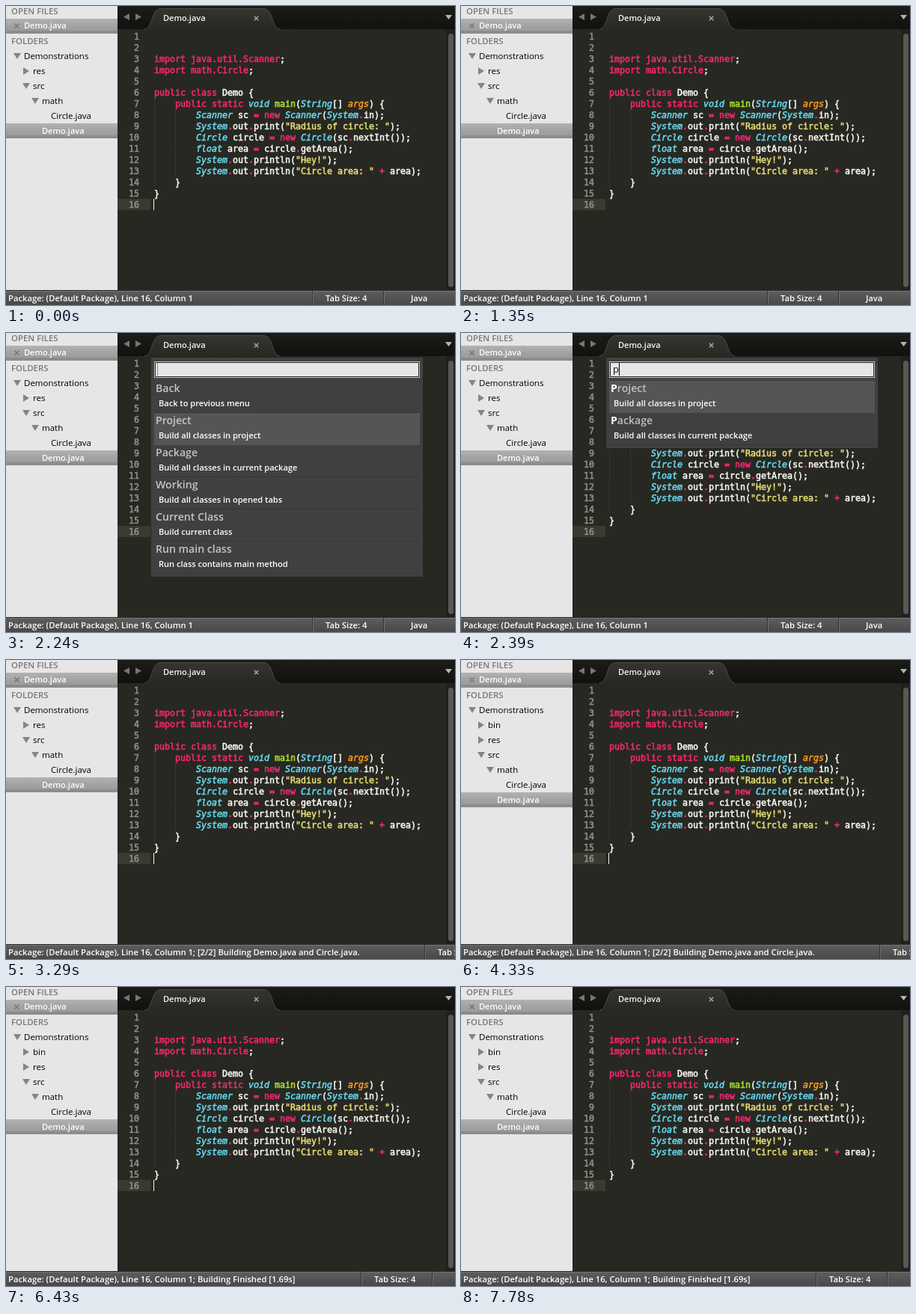
These frames come from a looping animation (600x400 px, 8 s). An HTML page with a canvas:

```html
<!DOCTYPE html>
<html lang="en">
<head>
<meta charset="utf-8">
<title>Building a Java project</title>
<style>
html, body { margin: 0; width: 100%; height: 100%; overflow: hidden; background: #272822; }
canvas { display: block; width: 600px; height: 400px; }
</style>
</head>
<body>
<canvas id="stage" width="600" height="400"></canvas>
<script>
const ctx = document.getElementById('stage').getContext('2d');
const LOOP = 8000, CHAR = 7, LINE = 15, CODE_X = 198;
const UI = '"Open Sans", "Noto Sans", sans-serif';
const MONO = '"DejaVu Sans Mono", monospace';
const HEADING = `600 11.4px ${UI}`, STATUS = `600 11.22px ${UI}`, TREE = `500 11.5px ${UI}`;
const PINK = '#f92672', CYAN = '#66d9ef', GREEN = '#a6e22e',
      ORANGE = '#fd971f', YELLOW = '#e6db74', WHITE = '#f8f8f2';

const code = `

import java.util.Scanner;
import math.Circle;

public class Demo {
    public static void main(String[] args) {
        Scanner sc = new Scanner(System.in);
        System.out.print("Radius of circle: ");
        Circle circle = new Circle(sc.nextInt());
        float area = circle.getArea();
        System.out.println("Hey!");
        System.out.println("Circle area: " + area);
    }
}
`.split('\n');

const menu = [
  ['Back', 'Back to previous menu'],
  ['Project', 'Build all classes in project'],
  ['Package', 'Build all classes in current package'],
  ['Working', 'Build all classes in opened tabs'],
  ['Current Class', 'Build current class'],
  ['Run main class', 'Run class contains main method']
];

// Caret opacity as [time, alpha] steps
const editorCaret = [[0, 1], [150, .4], [300, 0], [750, .4], [900, 1], [1200, .4], [1350, 0],
  [1800, 0], [3290, 1], [3590, .4], [3740, 0], [4190, .4], [4330, 1], [4630, .4], [4780, 0],
  [5230, .4], [5380, 1], [5680, .4], [5830, 0], [6280, .4], [6430, 1], [6730, .4], [6880, 0],
  [7330, .4], [7480, 1], [7630, .4], [7780, 0]];
const menuCaret = [[1800, 1], [2100, .4], [2250, 0], [2390, 1], [2690, .4], [2840, 0]];
const stepAt = (steps, t) => steps.filter(s => s[0] <= t).pop()[1];

function rect(x, y, w, h, fill) {
  ctx.fillStyle = fill;
  ctx.fillRect(x, y, w, h);
}

function vertical(y, h, ...colors) {
  const g = ctx.createLinearGradient(0, y, 0, y + h);
  colors.forEach((c, i) => g.addColorStop(i / (colors.length - 1), c));
  return g;
}

function text(s, x, y, fill, font = `600 11.05px ${UI}`) {
  ctx.font = font;
  ctx.fillStyle = fill;
  ctx.fillText(s, x, y);
}

function poly(fill, ...p) {
  ctx.fillStyle = fill;
  ctx.beginPath();
  for (let i = 0; i < p.length; i += 2) ctx.lineTo(p[i], p[i + 1]);
  ctx.fill();
}

function cross(x, y, r, color) {
  ctx.strokeStyle = color;
  ctx.lineWidth = 1.6;
  ctx.beginPath();
  ctx.moveTo(x - r, y - r); ctx.lineTo(x + r, y + r);
  ctx.moveTo(x + r, y - r); ctx.lineTo(x - r, y + r);
  ctx.stroke();
}

function caret(x, y, h, color, alpha) {
  ctx.globalAlpha = alpha;
  rect(x, y, 1, h, color);
  ctx.globalAlpha = 1;
}

function selectedRow(y) {
  rect(0, y, 149, 20, vertical(y, 20, '#b2b2b2', '#a2a2a2', '#989898'));
  rect(0, y + 16, 149, 4, '#8c8c8c');
}

function sidebar(hasBin) {
  rect(0, 0, 149, 380, '#e6e6e6');
  text('OPEN FILES', 7, 11, '#777', HEADING);
  selectedRow(17);
  cross(14.5, 26.5, 3, '#777');
  text('Demo.java', 24, 30, '#fff');
  text('FOLDERS', 7, 51, '#777', HEADING);

  const tree = [['Demonstrations', 24, 'open'], ['res', 36, 'shut'], ['src', 36, 'open'],
    ['math', 48, 'open'], ['Circle.java', 60], ['Demo.java', 48]];
  if (hasBin) tree.splice(1, 0, ['bin', 36, 'shut']);
  tree.forEach(([name, x, fold], i) => {
    const y = 67 + 20 * i, last = i === tree.length - 1;
    if (last) selectedRow(y - 10);
    if (fold === 'open') poly('#858585', x - 14, y - 4, x - 4, y - 4, x - 9, y + 4);
    if (fold === 'shut') poly('#858585', x - 13, y - 5, x - 5, y, x - 13, y + 5);
    text(name, x, y + 4, last ? '#fff' : '#000', last ? undefined : TREE);
  });
}

function tabs() {
  rect(149, 0, 451, 31, vertical(0, 31, '#1b1c18', '#11120f'));
  ctx.beginPath();
  ctx.moveTo(185, 31);
  ctx.bezierCurveTo(197, 30, 193, 3.5, 207, 3.5);
  ctx.lineTo(344, 3.5);
  ctx.bezierCurveTo(358, 3.5, 354, 30, 366, 31);
  ctx.fillStyle = vertical(4, 27, '#34352f', '#272822');
  ctx.fill();
  ctx.strokeStyle = '#4b4c46';
  ctx.lineWidth = 1;
  ctx.stroke();
  poly('#777873', 165, 10, 165, 19, 157, 14.5);
  poly('#777873', 173, 10, 173, 19, 181, 14.5);
  poly('#b4b4b0', 587, 12, 596, 12, 591.5, 18);
  text('Demo.java', 210, 20, '#f4f4f0');
  cross(334.5, 16.5, 2.7, '#a4a5a0');
}

function tokenStyle(word, line) {
  if (word[0] === '"') return [YELLOW];
  if (line.startsWith('import') && word !== ';') return [PINK];
  if (/^(public|class|static|new|[.=+])$/.test(word)) return [PINK];
  if (/^(void|float|String|Scanner|System|Circle)$/.test(word)) return [CYAN, 'italic '];
  if (word === 'main') return [GREEN];
  if (word === 'args') return [ORANGE, 'italic '];
  return [WHITE];
}

// Slightly thickened monospace text
function mono(s, x, y, fill, slant = '') {
  text(s, x, y, fill, `${slant}11.63px ${MONO}`);
  ctx.strokeStyle = fill;
  ctx.lineWidth = .55;
  ctx.strokeText(s, x, y);
}

function guide(x, from, to) {
  for (let y = from; y < to; y += 2) rect(x, y, 1, 1, '#45463f');
}

function editor() {
  rect(149, 31, 451, 349, '#272822');
  rect(149, 258, 44, 15, '#3a3a30');
  guide(198, 123, 243);
  guide(226, 138, 228);
  code.forEach((line, i) => {
    const y = 45 + LINE * i, n = String(i + 1);
    mono(n, 178 - CHAR * n.length, y, '#8f908a');
    for (const m of line.matchAll(/"[^"]*"|\w+|\S/g))
      mono(m[0], CODE_X + CHAR * m.index, y, ...tokenStyle(m[0], line));
  });
  rect(588, 31, 12, 349, '#20211c');
  ctx.fillStyle = '#585955';
  ctx.beginPath();
  ctx.roundRect(591, 37, 7, 339, 3.5);
  ctx.fill();
}

function popup(t) {
  const typed = t >= 2390, items = typed ? menu.slice(1, 3) : menu;
  rect(194, 33, 363, 35 + 43 * items.length, '#404040');
  rect(198, 38, 355, 22, '#c8c8c8');
  rect(199, 39, 353, 20, '#222');
  rect(200, 40, 351, 18, '#e6e6e6');
  if (typed) text('p', 203, 53, '#111', `400 13px ${UI}`);
  caret(typed ? 211 : 202, 40, 17, '#000', stepAt(menuCaret, t));
  items.forEach(([title, note], i) => {
    const y = 64 + 43 * i, font = `600 14.1px ${UI}`;
    rect(198, y + 42, 355, 1, '#363636');
    if (title === 'Project') rect(198, y, 355, 43, '#555');
    if (typed) {
      const bold = `700 14.1px ${UI}`;
      text('P', 200, y + 15, '#fff', bold);
      text(title.slice(1), 200 + ctx.measureText('P').width, y + 15, '#bebebe', font);
    } else text(title, 200, y + 15, '#c4c4c4', font);
    text(note, 204, y + 34, '#fff');
  });
}

function statusBar(t) {
  const [message, split] = t < 3290 ? ['', 410]
    : t < 4930 ? ['; [2/2] Building Demo.java and Circle.java.', 560]
    : ['; Building Finished [1.69s]', 475];
  rect(0, 380, 600, 20, vertical(380, 20, '#5f5f5f', '#484848'));
  rect(0, 380, 600, 1, '#2a2a2a');
  rect(0, 381, 600, 1, '#747474');
  text('Package: (Default Package), Line 16, Column 1' + message, 3, 395, '#fff', STATUS);
  for (const x of [split, split + 95]) {
    rect(x - 1, 381, 1, 19, '#333');
    rect(x, 381, 1, 19, '#707070');
  }
  text('Tab Size: 4', split + 17, 395, '#fff', STATUS);
  text('Java', split + 131, 395, '#fff', STATUS);
}

function draw(now) {
  const t = now % LOOP;
  editor();
  tabs();
  sidebar(t >= 4040);
  if (t >= 1800 && t < 3290) popup(t);
  else caret(197, 258, 15, WHITE, stepAt(editorCaret, t));
  statusBar(t);
  requestAnimationFrame(draw);
}
requestAnimationFrame(draw);
</script>
</body>
</html>
```
